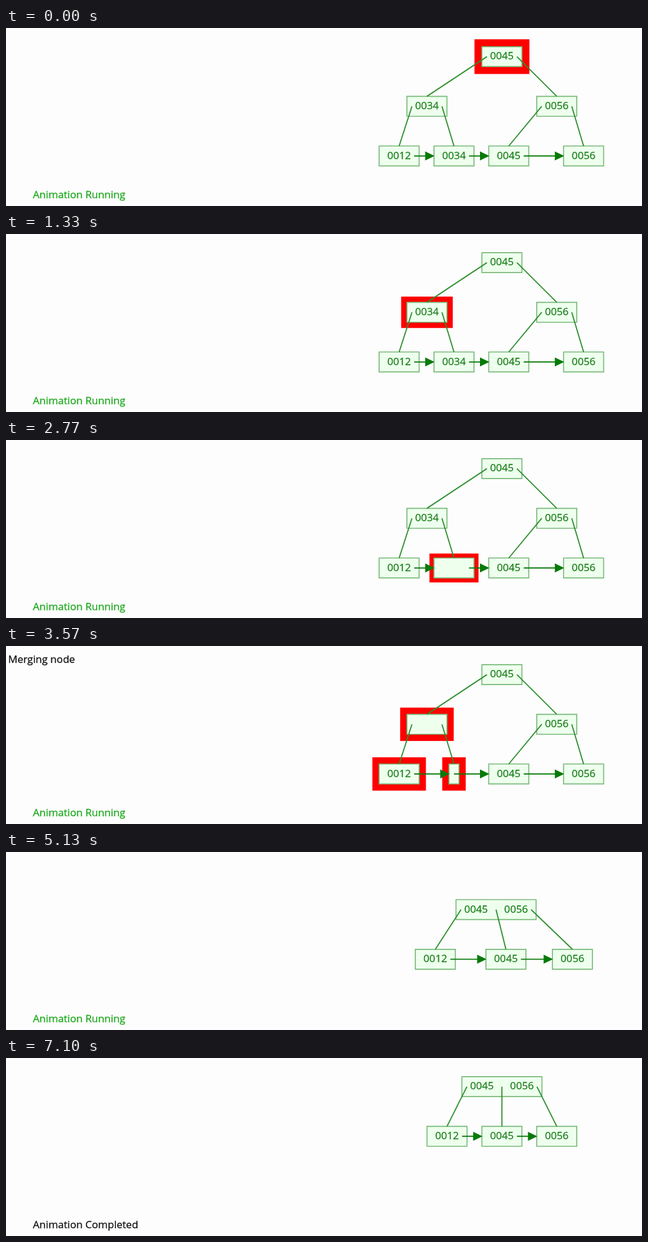
An HTML page with a canvas for the animation above (7130 ms loop, 1052x296 px).

```html
<!DOCTYPE html>
<html lang="en">
<head>
<meta charset="utf-8">
<title>Tree deletion</title>
<style>
  html, body { margin: 0; width: 100%; height: 100%; overflow: hidden; background: #fdfdfd; }
  canvas { display: block; }
</style>
</head>
<body>
<canvas id="stage" width="1052" height="296"></canvas>
<script>
const ctx = document.getElementById('stage').getContext('2d');

const LOOP = 7130;
const UNIT = 1.655;
const CELL = 40 * UNIT;
const HALF_HEIGHT = 10 * UNIT;
const ROWS = [47.6, 130.2, 212.8];
const PULSE = { period: 1710, peak: -10, min: 3, max: 7 };
const COLORS = {
  page: '#fdfdfd', fill: '#eeffee', border: '#77b877', edge: '#2f8f2f', arrow: '#087a08',
  key: '#1c7f1c', highlight: '#ff0000', running: '#1ca81c', dark: '#141414'
};

// Start time of each step
const AT = {
  inner: 1130, leaf: 1700, erase: 2580, mergeLeaf: 3300,
  mergeInner: 3840, label: 4380, rise: 4910, done: 5440
};

const mix = (a, b, p) => a + (b - a) * p;
const progress = (t, from, to) => Math.min(1, Math.max(0, (t - from) / (to - from)));
const node = (x, y, keys, kids = [], lit = false) => ({ x, y, keys, kids, lit });
const halfWidth = n => n.keys.length ? n.keys.length * CELL / 2 : 5 * UNIT;
const reach = n => halfWidth(n) - 5 * UNIT;

function fullTree(t) {
  const erased = t >= AT.erase;
  const merging = t >= AT.mergeLeaf;
  const [top, mid, low] = ROWS;
  const a = node(650.3, low, ['0012'], [], merging);
  const b = node(741, low, merging ? [] : [erased ? '' : '0034'], [], t >= AT.leaf);
  const c = node(831.6, low, ['0045']);
  const d = node(955.4, low, ['0056']);
  const innerLit = merging || (t >= AT.inner && t < AT.leaf);
  const left = node(696.3, mid, [merging ? '' : '0034'], [a, b], innerLit);
  const right = node(911, mid, ['0056'], [c, d]);
  const root = node(820.3, top, ['0045'], [left, right], t < AT.inner);
  return { nodes: [root, left, right, a, b, c, d], leaves: [a, b, c, d] };
}

function reducedTree() {
  const [top, mid, low] = ROWS;
  const leaves = [node(696.3, low, ['0012']), node(831.6, low, ['0045']), node(955.4, low, ['0056'])];
  const left = node(696.3, mid, [], leaves.slice(0, 1), true);
  const right = node(911, mid, ['0056'], leaves.slice(1), true);
  const root = node(820.3, top, ['0045'], [left, right], true);
  return { nodes: [root, left, right, ...leaves], leaves };
}

function mergedTree(t) {
  const p = progress(t, AT.rise, AT.done);
  const risen = t >= AT.rise;
  const [top, mid, low] = ROWS;
  const leafY = mix(low, mid, p);
  const leaves = [
    node(mix(696.3, 729.5, p), leafY, ['0012']),
    node(mix(831.6, 820.3, p), leafY, ['0045']),
    node(mix(955.4, 911, p), leafY, ['0056'])
  ];
  const joint = node(mix(803.6, 820.3, p), mix(mid, top, p), [risen ? '0045' : '', '0056'], leaves);
  const nodes = [joint, ...leaves];
  if (!risen) nodes.unshift(node(820.3, top, [], [joint]));
  return { nodes, leaves };
}

function treeAt(t) {
  if (t < AT.mergeInner) return fullTree(t);
  return t < AT.label ? reducedTree() : mergedTree(t);
}

// Triangle wave for the thickness of the red frame
function frameSize(t) {
  const phase = (((t - PULSE.peak) / PULSE.period) % 1 + 1) % 1;
  return (mix(PULSE.min, PULSE.max, Math.abs(1 - 2 * phase)) + 0.5) * UNIT;
}

// A hairline outline gives the letters a slightly heavier weight
function write(text, x, y, color, align = 'left') {
  ctx.fillStyle = ctx.strokeStyle = color;
  ctx.lineWidth = 0.3;
  ctx.textAlign = align;
  ctx.fillText(text, x, y);
  ctx.strokeText(text, x, y);
}

function drawNode(n, t) {
  const w = halfWidth(n);
  if (n.lit) {
    const s = frameSize(t);
    ctx.fillStyle = COLORS.highlight;
    ctx.fillRect(n.x - w - s, n.y - HALF_HEIGHT - s, 2 * (w + s), 2 * (HALF_HEIGHT + s));
  }
  ctx.fillStyle = COLORS.fill;
  ctx.strokeStyle = COLORS.border;
  ctx.lineWidth = UNIT;
  ctx.beginPath();
  ctx.rect(n.x - w, n.y - HALF_HEIGHT, 2 * w, 2 * HALF_HEIGHT);
  ctx.fill();
  ctx.stroke();
  n.keys.forEach((key, i) => {
    write(key, n.x + (i - (n.keys.length - 1) / 2) * CELL, n.y + 4.8, COLORS.key, 'center');
  });
}

function line(x1, y1, x2, y2, color) {
  ctx.strokeStyle = color;
  ctx.lineWidth = 1.9;
  ctx.beginPath();
  ctx.moveTo(x1, y1);
  ctx.lineTo(x2, y2);
  ctx.stroke();
}

function drawEdges(n) {
  const last = n.kids.length - 1;
  n.kids.forEach((kid, i) => {
    // An only child hangs from the middle
    const offset = last ? mix(-reach(n), reach(n), i / last) : 0;
    line(n.x + offset, n.y, kid.x, kid.y - HALF_HEIGHT, COLORS.edge);
  });
}

function drawArrow(from, to) {
  const tip = to.x - halfWidth(to) + 1;
  line(from.x + reach(from), from.y, tip - 8, from.y, COLORS.arrow);
  ctx.fillStyle = COLORS.arrow;
  ctx.beginPath();
  ctx.moveTo(tip, from.y);
  ctx.lineTo(tip - 15.5, from.y - 7.5);
  ctx.lineTo(tip - 15.5, from.y + 7.5);
  ctx.fill();
}

function draw(t) {
  ctx.fillStyle = COLORS.page;
  ctx.fillRect(0, 0, 1052, 296);
  ctx.font = '17.1px "Open Sans", "Noto Sans", sans-serif';

  const { nodes, leaves } = treeAt(t);
  nodes.forEach(n => drawNode(n, t));
  nodes.forEach(drawEdges);
  leaves.slice(1).forEach((leaf, i) => drawArrow(leaves[i], leaf));

  if (t >= AT.label && t < AT.rise) {
    const p = progress(t, AT.label, AT.rise);
    write('0045', mix(820.3, 770.5, p), mix(ROWS[0], ROWS[1], p) + 4.8, COLORS.dark, 'center');
  }
  if (t >= AT.mergeLeaf && t < AT.rise) write('Merging node', 3.5, 27.5, COLORS.dark);
  if (t < AT.done) write('Animation Running', 44.5, 283.3, COLORS.running);
  else write('Animation Completed', 44.5, 283.3, COLORS.dark);
}

const start = performance.now();
function tick() {
  draw((performance.now() - start) % LOOP);
  requestAnimationFrame(tick);
}
tick();
</script>
</body>
</html>
```
